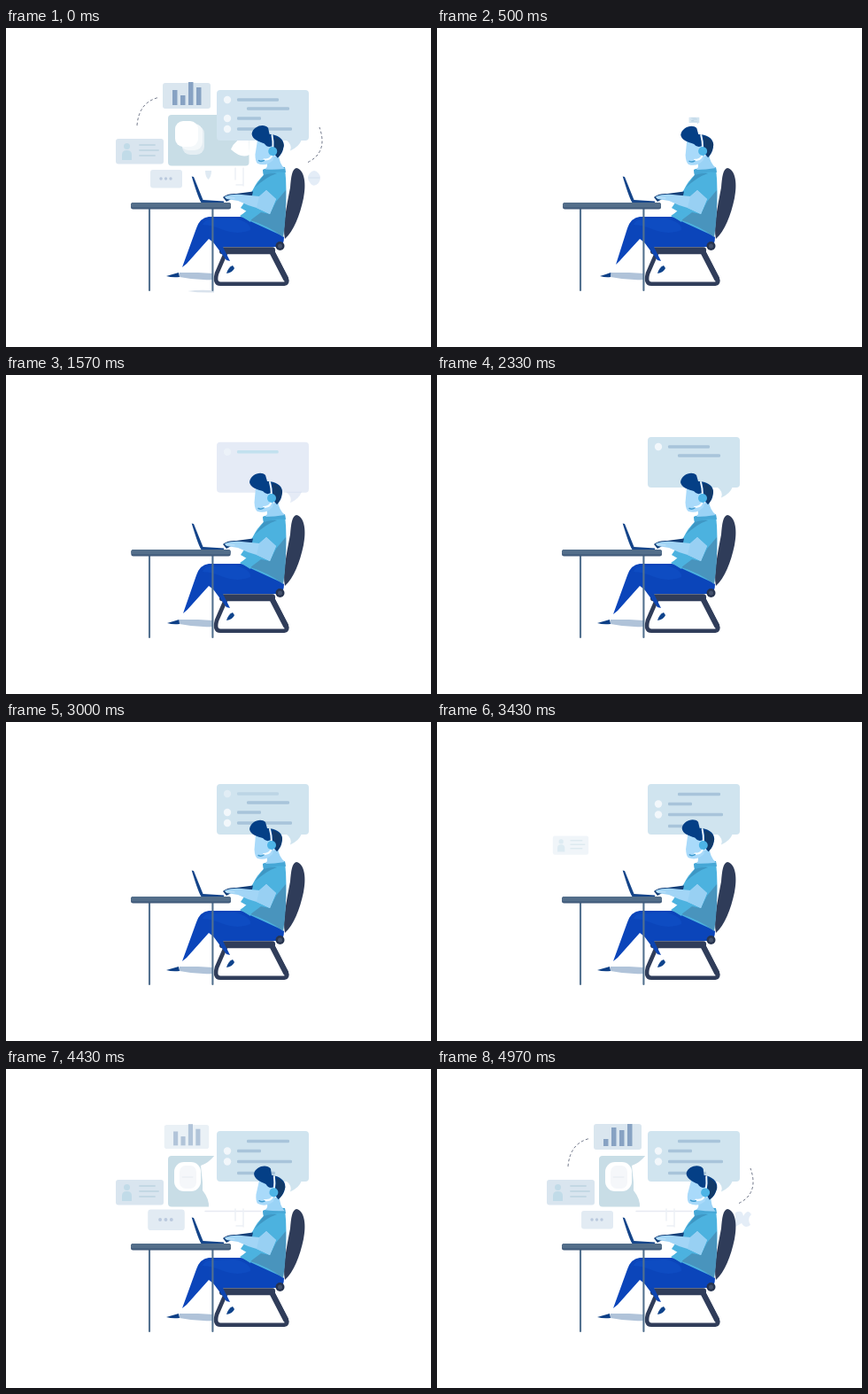
An HTML page with a canvas for the animation above (5 s loop, 480x360 px).

```html
<!DOCTYPE html>
<html lang="en">
<head>
<meta charset="utf-8">
<title>Support desk</title>
<style>
html, body { margin: 0; width: 100%; height: 100%; overflow: hidden; background: #fff; }
canvas { display: block; width: 480px; height: 360px; }
</style>
</head>
<body>
<canvas id="stage" width="480" height="360"></canvas>
<script>
const ctx = document.getElementById('stage').getContext('2d');
const LOOP = 5000, OUT_END = 530;
const start = performance.now();

const clamp = v => Math.max(0, Math.min(1, v));
const ramp = (t, a, b) => clamp((t - a) / (b - a));
const smooth = p => p * p * (3 - 2 * p);
const backOut = (p, c = 1.7) => 1 + (c + 1) * (p - 1) ** 3 + c * (p - 1) ** 2;

function keyed(t, keys) {
  if (t <= keys[0][0]) return keys[0][1];
  for (let i = 1; i < keys.length; i++) {
    const [a, u] = keys[i - 1], [b, v] = keys[i];
    if (t <= b) return u + (v - u) * smooth((t - a) / (b - a));
  }
  return keys[keys.length - 1][1];
}

function shape(d, color) {
  ctx.fillStyle = color;
  ctx.fill(new Path2D(d));
}

function stroke(d, color, width, cap = 'round') {
  ctx.strokeStyle = color;
  ctx.lineWidth = width;
  ctx.lineCap = cap;
  ctx.lineJoin = 'round';
  ctx.stroke(new Path2D(d));
}

function box(x, y, w, h, r, color) {
  ctx.fillStyle = color;
  ctx.beginPath();
  ctx.roundRect(x, y, w, h, r);
  ctx.fill();
}

function dot(x, y, r, color) {
  ctx.fillStyle = color;
  ctx.beginPath();
  ctx.arc(x, y, r, 0, Math.PI * 2);
  ctx.fill();
}

// Shrinks away at the beginning of the loop, pops back at `enter`
function pop(t, cx, cy, enter, leave, draw) {
  const closing = t < OUT_END;
  const s = closing ? 1 - ramp(t, 30, leave) ** 2 : backOut(ramp(t, enter, enter + 380), 2.3);
  if (s <= 0.01 || (!closing && t <= enter)) return;
  ctx.save();
  ctx.globalAlpha = closing ? clamp(s * 4) : ramp(t, enter, enter + 180);
  ctx.translate(cx, cy);
  ctx.scale(s, s);
  ctx.translate(-cx, -cy);
  draw();
  ctx.restore();
}

function picture(t) {
  box(183, 98, 91.5, 57.5, 4, '#c8dde6');
  if (t < OUT_END) {
    box(199, 110, 25, 33, 9, '#e5eef3');
    box(197, 108, 25, 30, 9, '#f4f8fa');
    box(191, 105, 26, 29, 9, '#fff');
    shape('M254 137Q258 126 274 120L275 143Q266 148 254 137Z', '#fff');
  } else {
    box(190, 105, 30, 33, 11, '#fff');
    box(196, 109, 19, 26, 7, '#f5f7fa');
    stroke('M199 122H211', '#e5eaf0', 1);
    // white foliage in front of the right half
    shape('M222 122Q229 127 238 126H276V157H229Q230 147 222 137Z', '#fff');
    shape('M220 109Q229 106 236 97H276V128H222Z', '#fff');
    stroke('M225 160.5H288', '#e7eaf2', 1.5);
  }
  stroke('M259 158V171M268 158V178M260 177H267', '#edf1f6', 1.5);
}

function chart(t) {
  box(177, 62, 54, 29, 3, '#dae6ef');
  const tall = [17, 11, 26, 20], late = [8, 21, 18, 25];
  const mix = t < OUT_END ? 0 : smooth(ramp(t, 4680, 4950));
  tall.forEach((h, i) => {
    const now = h + (late[i] - h) * mix;
    box(188 + i * 9, 87 - now, 5.5, now, 0, '#87a2c3');
  });
}

function profile() {
  box(124, 125, 54, 28.5, 3, '#d9e5ef');
  dot(136.5, 133.5, 3.5, '#c1dbe8');
  shape('M131 149V143Q131 138 136.5 138Q142 138 142 143V149Z', '#c1dbe8');
  stroke('M151 132H168M151 138H172M151 144H168', '#c3d8e4', 1.8);
}

function dotsCard() {
  box(163, 160, 36, 20.5, 3, '#e2ebf3');
  [175, 180.5, 186].forEach(x => dot(x, 170, 1.7, '#bac9de'));
}

function leaves(t) {
  if (t < OUT_END) {
    shape('M343 164Q348 158 353 164Q357 169 353 175Q347 181 343 174Q339 169 343 164Z', '#e4edf7');
    stroke('M342 169H354', '#d4e1ef', 1);
  } else {
    shape('M337 162Q345 158 346 166Q351 157 355 164Q350 169 354 176Q348 181 344 174L337 178Z', '#e4edf7');
  }
}

function arcs(t) {
  const a = t < OUT_END ? 1 - ramp(t, 30, 350) : ramp(t, 4450, 4700);
  if (!a) return;
  ctx.save();
  ctx.globalAlpha = a;
  ctx.setLineDash([3, 2.5]);
  stroke('M148 110Q150 84 172 78.5', '#6b7285', 1, 'butt');
  stroke('M341 151.5Q364 140 354 112', '#6b7285', 1, 'butt');
  ctx.restore();
}

function messages(t) {
  const closing = t < OUT_END;
  const scroll = closing ? 0 : 9.5 * smooth(ramp(t, 3060, 3320));
  const base = ctx.globalAlpha;
  // x from, x to, y, entry time, has bullet
  const rows = [
    [261, 308, 81, 1400, true], [272, 320, 91, 2130, false], [261, 288, 102, 2420, true],
    [261, 323, 114, 2680, true], [261, 304, 127, 3330, false]
  ];
  rows.forEach(([a, b, y, enter, bullet], i) => {
    if (closing && i === 4) return;
    const p = closing ? 1 : smooth(ramp(t, enter, enter + 180));
    if (!p) return;
    ctx.globalAlpha = base * (i || closing ? 1 : 1 - ramp(t, 2940, 3060));
    if (bullet) dot(250, y - scroll, 4.2 * p, '#f2f7fb');
    const faint = i === 0 && t > 1400 && t < 1700;
    box(a, y - scroll - 1.7, (b - a) * p, 3.4, 1.2, faint ? '#a9d9ea' : '#a8c4da');
  });
}

function bubble(t) {
  const closing = t < OUT_END;
  if (!closing && t < 1485) return;
  ctx.save();
  let color = '#d2e4f0';
  if (closing) {
    const s = 1 - ramp(t, 30, OUT_END) ** 2;
    ctx.translate(290.5, 104);
    ctx.scale(s, s);
    ctx.translate(-290.5, -104 + 5 * (1 - s));
  } else {
    const green = 218 + 10 * ramp(t, 1540, 1750);
    color = `rgb(208 ${green} 239)`;
    ctx.globalAlpha = ramp(t, 1485, 1640);
    ctx.translate(0, 30 * (1 - backOut(ramp(t, 1485, 1835))));
  }
  box(238, 70, 104, 57, 4, color);
  shape('M316 126H334Q331 134 321 138.5Q324 132 316 126Z', color);
  messages(t);
  ctx.restore();
}

function chair() {
  shape('M328 158C338 160 339 178 336 192C332 211 325 229 315 238C312 224 317 201 321 180C322 168 323 159 328 158Z', '#2f3c59');
  stroke('M248 254L238 277Q235 288.8 242 288.8H314Q319 288 316.5 282L302 254', '#303d5a', 4.6);
  stroke('M301 254L316 283', '#303d5a', 6);
  box(241, 247.3, 63, 8, 3, '#303d5a');
}

function legs(t, k) {
  shape('M196 276L217 276L234 277V284Q215 285 196 281Z', '#b0c3d9');
  if (t < 100) shape('M205 297Q220 295 235 296.5V298.5Q218 299 205 297Z', '#d9e2ec');
  shape('M229 235L243 243L253 263L249 262Z', '#0d45b2');
  shape('M249 277Q251 270 256 268L258 271Q256 276 249 277Z', '#0f438b');
  shape(`M314 236C302 225 285 213 264 213H229Q219 214 215 226L${199 + k} ${270 - k}L${204 + k * .7} ${266 - k}L229 238L241 247H309Q314 245 314 236Z`, '#0b45ba');
  shape('M222 222Q224 215 235 216L258 215Q277 219 276 228Q262 234 246 228Q232 222 222 222Z', '#0e4cc2');
  shape(`M${181 + k} 280Q${188 + k} 278 ${195 + k * .4} 276L196 281Q${188 + k} 282 ${181 + k} 280Z`, '#0d3f86');
}

function torso() {
  shape('M290 160Q302 155 315 158Q318 184 315 215L313 235L278 219L264 212L272 207L265 203L278 184Q284 172 291 166Z', '#4cb2df');
  shape('M316 183Q317 212 313 236Q296 223 276 217L288 208L298 210L305 196Z', '#4994bd');
  shape('M265 212L272 206L280 209L276 219Z', '#4cb2df');
  shape('M290 160Q302 155 315 157L316 163Q304 161 291 167Z', '#46a7d6');
  shape('M291 166Q302 163 306 164Q294 168 281 180Z', '#3e97c4');
}

function laptopAndArms() {
  shape('M209.7 167.5L212 168L222.5 194L246 195.5V197.5H221Q218 195 209.7 167.5Z', '#15458a');
  shape('M245 191Q250 186.5 260 187L279 184.5L278 189L256 192L249 196Z', '#143f78');
  shape('M247 190Q256 187 266 188L286 190L294 183L305 193L298 210L283 203Q272 200 262 195L249 193Z', '#a2d5f6');
  shape('M286 190L294 183L305 193L298 210L283 203Z', '#98d0f3');
  stroke('M248 191.5L258 192', '#c8e6fa', 1);
}

function head(deg) {
  ctx.save();
  ctx.translate(299, 157);
  ctx.rotate(deg * Math.PI / 180);
  ctx.translate(-299, -157);
  shape('M293 150L307 142Q308 152 315 158Q303 160 293 160Q297 156 293 150Z', '#9ad3f6');
  shape('M282 127L280.5 144Q281 152 284 154Q294 157 301 149L305 132Z', '#a9dafa');
  shape('M275 121C276 112 288 108 293 113L295 120C304 120 311.5 124 312 131C312 139 309 143 306 146L301 141L299 133Q294 136 290 131C283 129 276 127 275 121Z', '#043f86');
  shape('M301 122Q311 125 312 132Q310 142 306 146L302 137Z', '#123a69');
  stroke('M298 121Q300 128 300 136', '#eef7fd', 2);
  dot(300, 139, 5, '#4db4e6');
  stroke('M299 145Q297 149 291 149', '#f6fcff', 2.2);
  stroke('M285 150.5Q288 152 291 150', '#3f9bd0', 1.5);
  ctx.restore();
}

function desk(k) {
  const inset = k / 3;
  stroke('M162 204V296M233.4 204V296', '#53718f', 2.1);
  box(141 + inset, 197, 113 - inset * 2, 7.4, 2.5, '#405a7a');
  box(141 + inset, 197, 113 - inset * 2, 5.4, 2.5, '#536e8a');
}

function render(t) {
  ctx.fillStyle = '#fff';
  ctx.fillRect(0, 0, 480, 360);
  const step = keyed(t, [[0, 0], [500, 3], [1570, 1], [2330, 0]]);
  const tilt = keyed(t, [[0, 4], [500, 0.4], [1570, 0], [3000, 0], [3900, 5.5], [4970, 10]]);

  pop(t, 229, 127, 4020, 430, () => picture(t));
  pop(t, 204, 77, 4330, 400, () => chart(t));
  pop(t, 151, 139, 3360, 420, profile);
  pop(t, 181, 170, 4200, 380, dotsCard);
  pop(t, 348, 170, 4450, 360, () => leaves(t));
  if (t < OUT_END) {
    pop(t, 228, 166, 0, 350, () => shape('M225 161H232Q232 168 228.5 171Q225 168 225 161Z', '#dfeaf3'));
  }
  arcs(t);
  bubble(t);

  chair();
  legs(t, step);
  torso();
  head(tilt);
  laptopAndArms();
  dot(309.5, 246, 5, '#27344f');
  dot(309.5, 246, 2.5, '#43516c');
  desk(step);
}

function frame(now) {
  render(Math.max(0, now - start) % LOOP);
  requestAnimationFrame(frame);
}
render(0);
requestAnimationFrame(frame);
</script>
</body>
</html>
```
